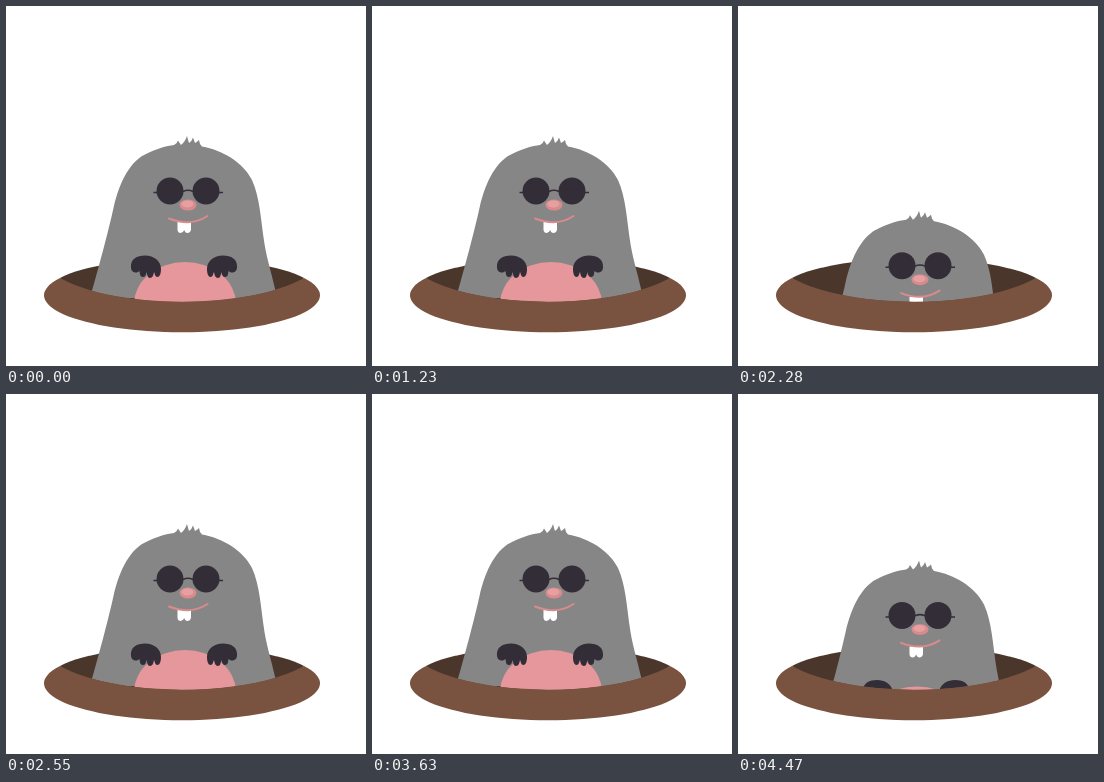
An HTML page that plays this animation: 360x360 px, repeating every 4500 ms.

```html
<!DOCTYPE html>
<html lang="en">
<head>
<meta charset="utf-8">
<title>Mole</title>
<style>
html, body { margin: 0; width: 100%; height: 100%; overflow: hidden; background: #fff; }
svg { display: block; width: 100%; height: 100%; }
</style>
</head>
<body>
<svg viewBox="0 0 360 360">
  <defs>
    <clipPath id="above"><path d="M0 0H360V272H298C242 304 110 304 54 272H0Z"/></clipPath>
    <path id="paw" fill="#332d37" d="M125 262C124 253 131 249.500 139 249.500C148 249.500 155 255 155 263C155 267 154 271 151.500 271C149 271 149 268 148 266C147.500 269 146.500 272 144 272C141.500 272 141.500 269 140.500 266C140 269 139 271 137 271C134 271 134 268 133.500 265C132 267 126 268 125 262Z"/>
  </defs>
  <path fill="#4b362b" d="M54 272A138 37 0 0 1 298 272L270 297H82Z"/>
  <g clip-path="url(#above)">
    <g id="mole">
      <path fill="#868686" d="M84 292C96 250 103 222 107.500 202C113.500 175 125 154 141 147.500C151 142.500 160 140 168 139Q171 138 172 134.500L175 139Q179 136 181 130Q182 134 183 137Q186 135 187 131.500L189 137Q191 136 193 134L194 138L196 140.500C216 144 237 156 246 174C254 192 254.500 212 258.500 238C261.500 256 267 272 271 292Z"/>
      <ellipse cx="179" cy="298" rx="51" ry="42" fill="#e6979b"/>
      <use href="#paw"/>
      <use href="#paw" transform="matrix(-1 0 0 1 356 0)"/>
      <g fill="#332d37">
        <circle cx="164" cy="185" r="13.500"/>
        <circle cx="200" cy="185" r="13.500"/>
      </g>
      <path fill="none" stroke="#332d37" stroke-width="1.500" d="M147.500 186.500H152M212 186.500H217M177 185.500Q182 183 187 185.500"/>
      <ellipse cx="182" cy="199" rx="8.500" ry="5.500" fill="#d98a8c"/>
      <ellipse cx="181.500" cy="198" rx="6" ry="3.500" fill="#e6a0a1"/>
      <path fill="#fff" d="M171.500 216H185V224Q184 227 181.500 227Q179 227 178.300 224Q177 227 174.500 227Q172 227 171.500 224Z"/>
      <path fill="none" stroke="#d98a8c" stroke-width="2" stroke-linecap="round" d="M163 212.500Q185 221 201.500 210"/>
    </g>
  </g>
  <path fill="#795340" d="M54 272C110 303.500 242 303.500 298 272A138 37 0 1 1 54 272Z"/>
</svg>
<script>
const LOOP = 4500, DIP = 420, DEPTH = 75;
const dipStarts = [648, 1364, 2080, 2796, 4154];
const mole = document.getElementById('mole');

function offsetAt(t) {
  const start = dipStarts.find(s => t >= s && t < s + DIP);
  return start === undefined ? 0 : DEPTH / 2 * (1 - Math.cos(2 * Math.PI * (t - start) / DIP));
}

function draw() {
  mole.setAttribute('transform', `translate(0 ${offsetAt(performance.now() % LOOP)})`);
  requestAnimationFrame(draw);
}
draw();
</script>
</body>
</html>
```
